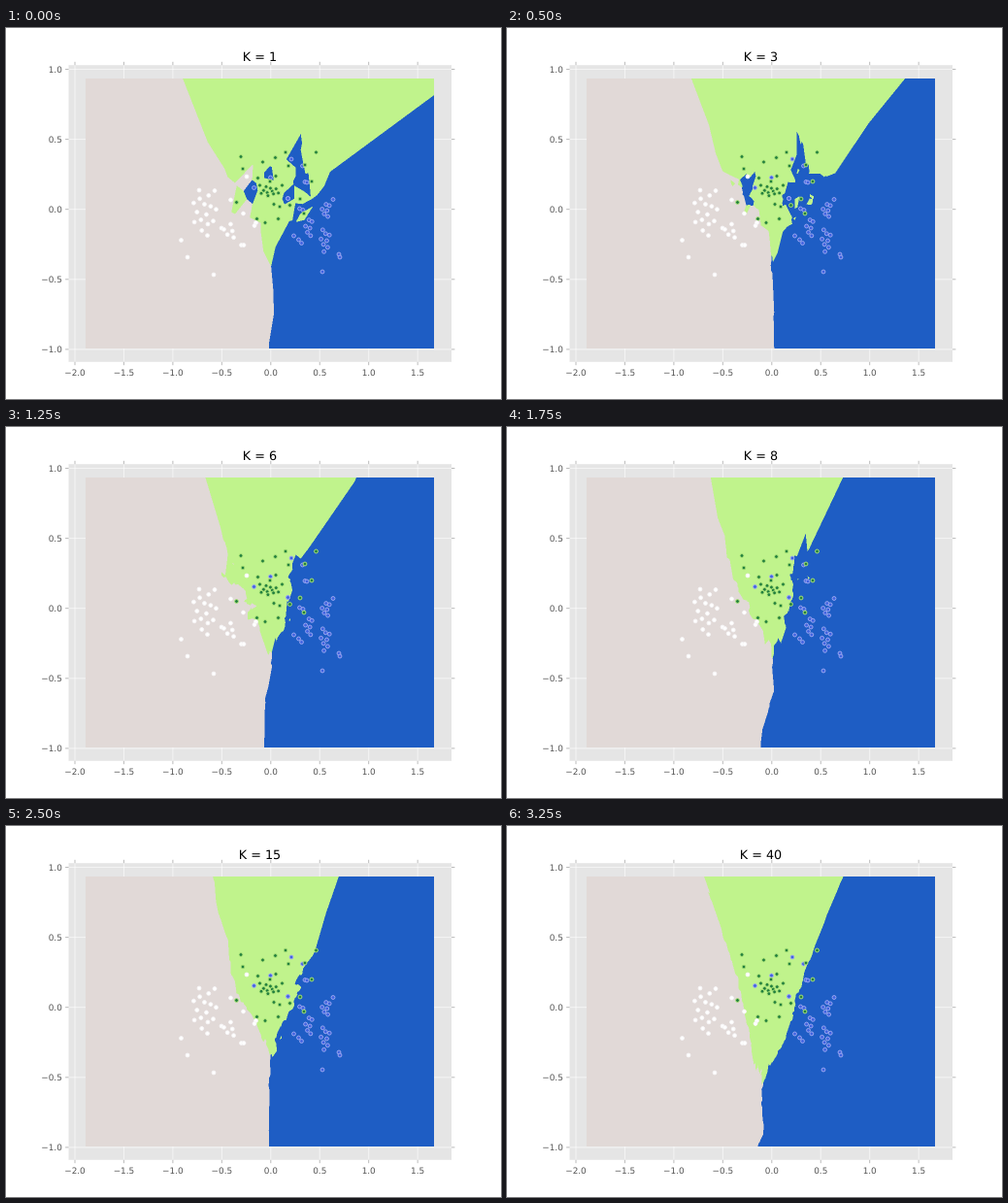
Recreate the animation shown at these times as an HTML page with a canvas. Size 510 by 382 pixels, loop 3.5 s.

```html
<!DOCTYPE html>
<html lang="en">
<head>
<meta charset="utf-8">
<title>Nearest neighbour regions</title>
<style>
  html, body { margin: 0; width: 100%; height: 100%; overflow: hidden; background: #fff; }
  svg, canvas { position: absolute; display: block; }
  svg { left: 0; top: 0; width: 510px; height: 382px; }
  canvas { left: 82px; top: 52px; width: 359px; height: 278px; }
  text {
    font-family: "DejaVu Sans", sans-serif; font-size: 8.9px; fill: #555;
    text-rendering: geometricPrecision;
  }
  #title { font-size: 12.75px; fill: #000; text-anchor: middle; }
</style>
</head>
<body>
<svg id="axes" viewBox="0 0 510 382"><text id="title" x="261.5" y="33.8"></text></svg>
<canvas id="map" width="718" height="556"></canvas>
<svg id="dots" viewBox="0 0 510 382"></svg>
<script>
const STEP = 250;
const KS = [1, 2, 3, 4, 5, 6, 7, 8, 9, 10, 15, 20, 30, 40];
const UNIT_X = 100.9, UNIT_Y = 144.2, ZERO_X = 272.8, ZERO_Y = 186.7;
const BOX = { l: 64.5, t: 38.2, r: 459, b: 343.8 };
const MAP = { x: 82, y: 52, scale: 2 };
const GOLDEN = Math.PI * (3 - Math.sqrt(5));

// Ties go to the class that comes first.
// keys: x, y of the points that shape the borders; blobs: count, centre, radii.
const CLASSES = [
  { area: [30, 93, 196], face: '#4163e0', edge: '#a3adf2',
    keys: [
      294,135, 305.5,142, 272.5,154, 255.5,164.5, 290.5,175.5, 290.5,175.5,
      308,158.5, 310,159, 337,176.5, 302.5,186, 306,187.5, 296.5,214,
      301.5,218, 304.5,221.5, 343,233, 344,236, 326,251],
    blobs: [[6, 312, 206, 4, 13], [6, 329.5, 188, 4.5, 10], [8, 329, 219, 6, 13]] },
  { area: [192, 243, 140], face: '#24803f', edge: '#b4ea7c',
    keys: [
      242,132.5, 244,145, 264.5,138, 277.5,133.5, 288,128, 319.5,128, 291,142,
      308,141, 259.5,154.5, 278,152.5, 272,158, 261.5,162, 284.5,162, 276,181.5,
      282,184, 292.5,182.5, 237.5,179.5, 258.5,196.5, 280.5,196.5, 267,200.5,
      315,158, 303,176, 307,191],
    blobs: [[10, 272, 168, 10, 6]] },
  { area: [225, 217, 215], face: '#fff', edge: '#f8f6f8',
    keys: [
      248,153, 199,167, 215,167.5, 231.5,177, 244.5,191, 257.5,200.5, 256,203.5,
      222,206, 180.5,218.5, 242.5,223.5, 245,223.5, 187,236, 214,254],
    blobs: [[14, 204, 192, 13, 25], [5, 231, 209, 7, 10]] }
];

const $ = id => document.getElementById(id);
const axes = $('axes'), title = $('title'), canvas = $('map');

function add(parent, tag, attrs, text) {
  const el = document.createElementNS('http://www.w3.org/2000/svg', tag);
  for (const key in attrs) el.setAttribute(key, attrs[key]);
  if (text) el.textContent = text;
  parent.appendChild(el);
}

const line = (x1, y1, x2, y2, stroke, width) =>
  add(axes, 'line', { x1, y1, x2, y2, stroke, 'stroke-width': width });

const label = v => (v < 0 ? '\u2212' : '') + Math.abs(v).toFixed(1);

function drawAxes() {
  const { l, t, r, b } = BOX, tick = 3.4;
  add(axes, 'rect', { x: l, y: t, width: r - l, height: b - t, fill: '#e5e5e5' });
  for (let v = -2; v <= 1.5; v += 0.5) {
    const x = ZERO_X + v * UNIT_X;
    line(x, t, x, b, '#fff', 0.6);
    line(x, t - tick, x, t, '#777', 0.5);
    line(x, b, x, b + tick, '#777', 0.5);
    add(axes, 'text', { x, y: 358, 'text-anchor': 'middle' }, label(v));
  }
  for (let v = -1; v <= 1; v += 0.5) {
    const y = ZERO_Y - v * UNIT_Y;
    line(l, y, r, y, '#fff', 0.6);
    line(l - tick, y, l, y, '#777', 0.5);
    line(r, y, r + tick, y, '#777', 0.5);
    add(axes, 'text', { x: 57.8, y: y + 3.1, 'text-anchor': 'end' }, label(v));
  }
}

const points = [];
CLASSES.forEach(({ keys, blobs }, cls) => {
  for (let i = 0; i < keys.length; i += 2) points.push({ x: keys[i], y: keys[i + 1], cls });
  for (const [count, cx, cy, rx, ry] of blobs) {
    for (let i = 0; i < count; i++) {
      const r = Math.sqrt((i + 0.5) / count), a = i * GOLDEN;
      points.push({ x: cx + rx * r * Math.cos(a), y: cy + ry * r * Math.sin(a), cls });
    }
  }
});

function drawDots() {
  for (const { x, y, cls } of points) {
    const { face, edge } = CLASSES[cls];
    add($('dots'), 'circle',
      { cx: x, cy: y, r: 1.95, fill: face, stroke: edge, 'stroke-width': 0.9 });
  }
}

// Winning class of every cell for every K.
function classify(w, h) {
  const n = points.length;
  const px = Float64Array.from(points, p => p.x / UNIT_X);
  const py = Float64Array.from(points, p => p.y / UNIT_Y);
  const cls = Uint8Array.from(points, p => p.cls);
  const order = Uint8Array.from(points, (p, i) => i);
  const dist = new Float64Array(n);
  const votes = [0, 0, 0];
  const maps = KS.map(() => new Uint8Array(w * h));
  const last = KS[KS.length - 1];

  for (let j = 0, cell = 0; j < h; j++) {
    const y = (MAP.y + (j + 0.5) / MAP.scale) / UNIT_Y;
    for (let i = 0; i < w; i++, cell++) {
      const x = (MAP.x + (i + 0.5) / MAP.scale) / UNIT_X;
      // The neighbouring cell's order is nearly sorted already.
      for (let a = 0; a < n; a++) {
        const p = order[a], dx = px[p] - x, dy = py[p] - y;
        const d = dx * dx + dy * dy;
        let b = a;
        while (b > 0 && dist[b - 1] > d) {
          dist[b] = dist[b - 1];
          order[b] = order[b - 1];
          b--;
        }
        dist[b] = d;
        order[b] = p;
      }
      votes.fill(0);
      for (let k = 1, m = 0; k <= last; k++) {
        votes[cls[order[k - 1]]]++;
        if (k === KS[m]) {
          let best = votes[1] > votes[0] ? 1 : 0;
          if (votes[2] > votes[best]) best = 2;
          maps[m++][cell] = best;
        }
      }
    }
  }
  return maps;
}

drawAxes();
drawDots();

const ctx = canvas.getContext('2d');
const image = ctx.createImageData(canvas.width, canvas.height);
const maps = classify(canvas.width, canvas.height);
let shown = -1;

function show(step) {
  if (step === shown) return;
  shown = step;
  const map = maps[step], data = image.data;
  for (let i = 0, o = 0; i < map.length; i++, o += 4) {
    const c = CLASSES[map[i]].area;
    data[o] = c[0];
    data[o + 1] = c[1];
    data[o + 2] = c[2];
    data[o + 3] = 255;
  }
  ctx.putImageData(image, 0, 0);
  title.textContent = 'K = ' + KS[step];
}

const start = performance.now();
function tick() {
  const t = performance.now() - start;
  show(Math.floor(t / STEP) % KS.length);
  requestAnimationFrame(tick);
}
show(0);
requestAnimationFrame(tick);
</script>
</body>
</html>
```
